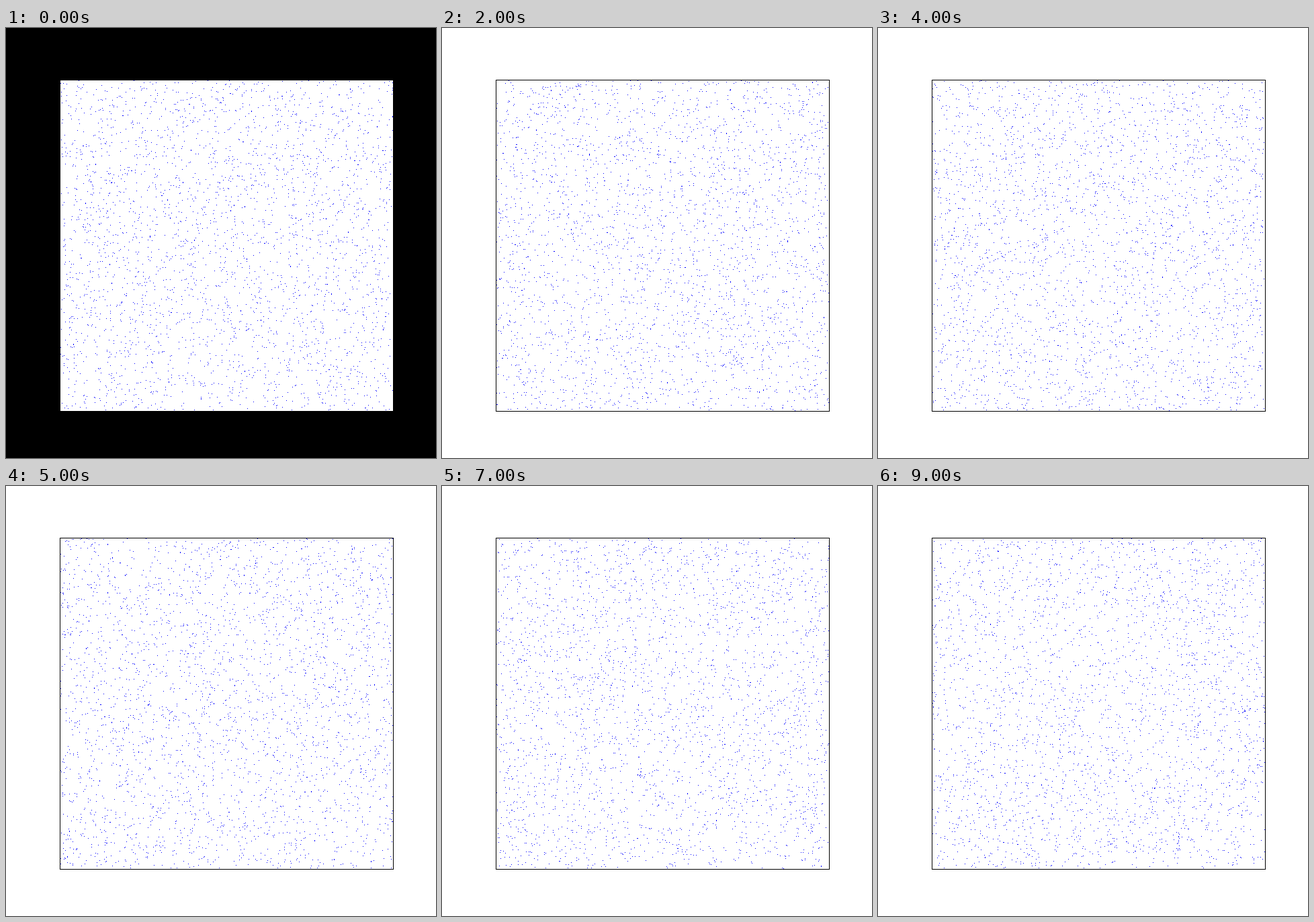
A matplotlib script for the animation above (10 s loop, 640 by 640 pixels).

```python
import numpy as np
import matplotlib.pyplot as plt
from matplotlib.animation import FuncAnimation

FRAMES = 10
DOTS = 3000
PIXEL = 0.72  # one pixel in points at 100 dpi

fig = plt.figure(figsize=(6.4, 6.4), dpi=100, facecolor="black")
ax = fig.add_axes([0.125, 0.11, 0.775, 0.77], xlim=(0, 1), ylim=(0, 1),
                  xticks=[], yticks=[])
for spine in ax.spines.values():
    spine.set_linewidth(PIXEL)
dots, = ax.plot([], [], "b,")


def draw(i):
    # The margin is black only on the first step.
    fig.set_facecolor("black" if i == 0 else "white")
    rng = np.random.default_rng(100 + i)
    dots.set_data(rng.random(DOTS), rng.random(DOTS))
    return dots,


def start():
    return draw(0)


anim = FuncAnimation(fig, draw, frames=FRAMES, init_func=start,
                     interval=1000, repeat=True, repeat_delay=0, blit=False)
plt.show()
```
